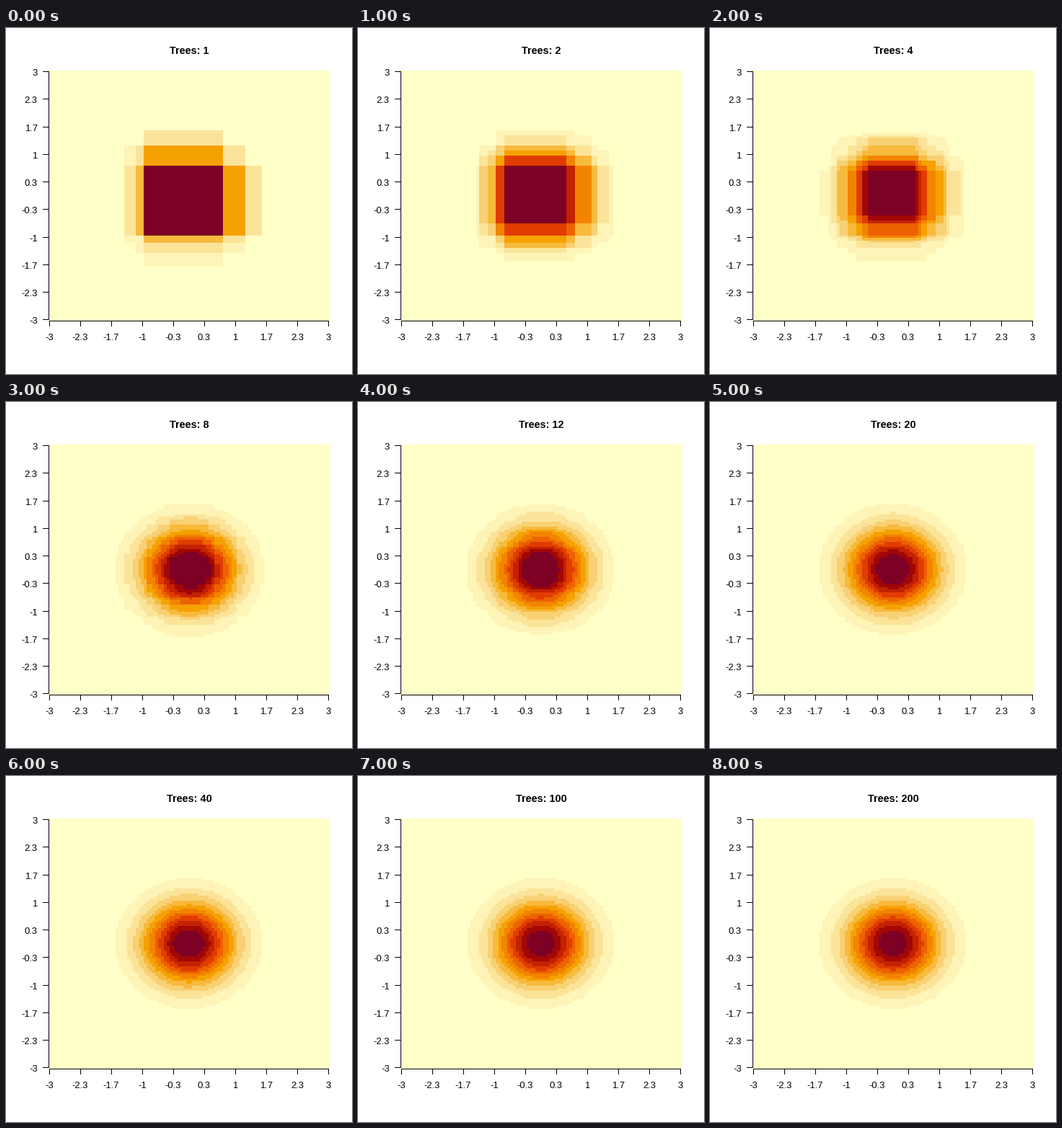
A matplotlib script that plays this animation: 480 by 480 pixels, repeating every 9000 ms.

```python
from itertools import pairwise

import numpy as np
import matplotlib.pyplot as plt
from matplotlib.animation import FuncAnimation
from matplotlib.patches import Rectangle

SIZE, DPI, CELLS, BINS = 480, 100, 100, 12
LEFT, RIGHT, TOP, BOTTOM = 59.04, 449.76, 59.03, 406.55
TREES = [1, 2, 4, 8, 12, 20, 40, 100, 200]

# Column and row splits of the first trees
SPLITS = [
    ([27, 31, 34, 62, 70, 76], [24, 30, 38, 66, 69, 73, 78]),
    ([28, 37, 59, 68, 74], [26, 32, 34, 61, 71, 76]),
    ([24, 39, 60, 69], [27, 40, 58, 68]),
    ([30, 41, 58, 65, 75], [25, 36, 60, 67, 76]),
]


def heat_colors(n=BINS):
    """Yellow-orange-red ramp in polar LUV space, light to dark."""
    t = np.linspace(0, 1, n)
    hue = np.radians(85 - 80 * t)
    lum = 99 - 74 * t ** 1.3
    peak = 140 / 245
    s = t ** 1.6
    chroma = np.where(s <= peak, 40 + 140 * s / peak,
                      180 - 105 * (s - peak) / (1 - peak))
    y = ((lum + 16) / 116) ** 3
    u = chroma * np.cos(hue) / (13 * lum) + 0.1978
    v = chroma * np.sin(hue) / (13 * lum) + 0.4683
    x = 2.25 * y * u / v
    z = 3 * y / v - 5 * y - x / 3
    to_rgb = np.array([[3.240479, -1.537150, -0.498535],
                       [-0.969256, 1.875992, 0.041556],
                       [0.055648, -0.204043, 1.057311]])
    rgb = np.clip(np.stack([x, y, z], 1) @ to_rgb.T, 0, 1)
    rgb = np.where(rgb > 0.00304, 1.055 * rgb ** (1 / 2.4) - 0.055, 12.92 * rgb)
    return np.round(rgb * 255).astype(np.uint8)


def bell(cells):
    return np.exp(-(cells * 6 / (CELLS - 1)) ** 2)


def leaf_means(cuts):
    """Bell curve averaged between neighbouring splits."""
    curve = bell(CENTERS)
    for a, b in pairwise([0, *cuts, CELLS]):
        curve[a:b] = curve[a:b].mean()
    return curve


def snapped_bell(n, rng, width=8):
    """Bell curve over the average of n staggered staircases."""
    phase = (np.arange(n) + rng.random(n)) / n
    steps = np.floor(CENTERS[:, None] / width + phase) + 0.5 - phase
    return bell(width * steps.mean(axis=1))


def surface(n):
    """Prediction of n trees, scaled so that its peak is about 1."""
    if n <= len(SPLITS):
        total = sum(np.outer(leaf_means(rows), leaf_means(cols))
                    for cols, rows in SPLITS[:n])
        return (total / total.max()) ** 1.05
    rng = np.random.default_rng(n)
    return np.outer(snapped_bell(n, rng), snapped_bell(n, rng)) / (1 - 0.9 / n)


def pixel_spans(start, end):
    return np.diff(np.floor(np.linspace(start, end, CELLS + 1)).astype(int))


def picture(n):
    levels = np.clip(BINS * surface(n), 0, BINS - 1).astype(int)
    levels = np.repeat(levels, pixel_spans(TOP, BOTTOM), axis=0)
    return COLORS[np.repeat(levels, pixel_spans(LEFT, RIGHT), axis=1)]


def tick_pixels(start, end):
    half = (end - start) / CELLS / 2
    return np.linspace(start + half, end - half, 10).astype(int)


def bar(x, y, w, h):
    ax.add_patch(Rectangle((x, y), w, h, fc="black", lw=0, aa=False))


def label(x, y, text, px, **kw):
    return ax.text(x, y, text, fontsize=px * 72 / DPI, va="baseline",
                   family="Liberation Sans", **kw)


CENTERS = np.arange(CELLS) - (CELLS - 1) / 2
COLORS = heat_colors()
PICTURES = [picture(n) for n in TREES]

fig = plt.figure(figsize=(SIZE / DPI, SIZE / DPI), dpi=DPI, facecolor="white")
ax = fig.add_axes([0, 0, 1, 1])
ax.axis("off")
heat = ax.imshow(PICTURES[0], extent=(59, 449, 406, 59),
                 interpolation="nearest", aspect="auto")
ax.set_xlim(0, SIZE)
ax.set_ylim(SIZE, 0)

xs, ys = tick_pixels(LEFT, RIGHT), tick_pixels(TOP, BOTTOM)
bar(xs[0], 406, xs[-1] - xs[0] + 1, 1)
bar(59, ys[0], 1, ys[-1] - ys[0] + 1)
for value, x, y in zip(np.linspace(-3, 3, 10), xs, ys[::-1]):
    name = f"{round(value, 1):g}"
    bar(x, 406, 1, 8)
    bar(51, y, 9, 1)
    label(x, 433, name, 13, ha="center")
    label(43.7, y + 6, name, 13, ha="right")
title = label(254.4, 36, "", 14.4, ha="center", weight="bold")


def update(i):
    heat.set_data(PICTURES[i])
    title.set_text(f"Trees: {TREES[i]}")
    return heat, title


anim = FuncAnimation(fig, update, frames=len(TREES), interval=1000,
                     repeat=True, repeat_delay=0)
plt.show()
```
